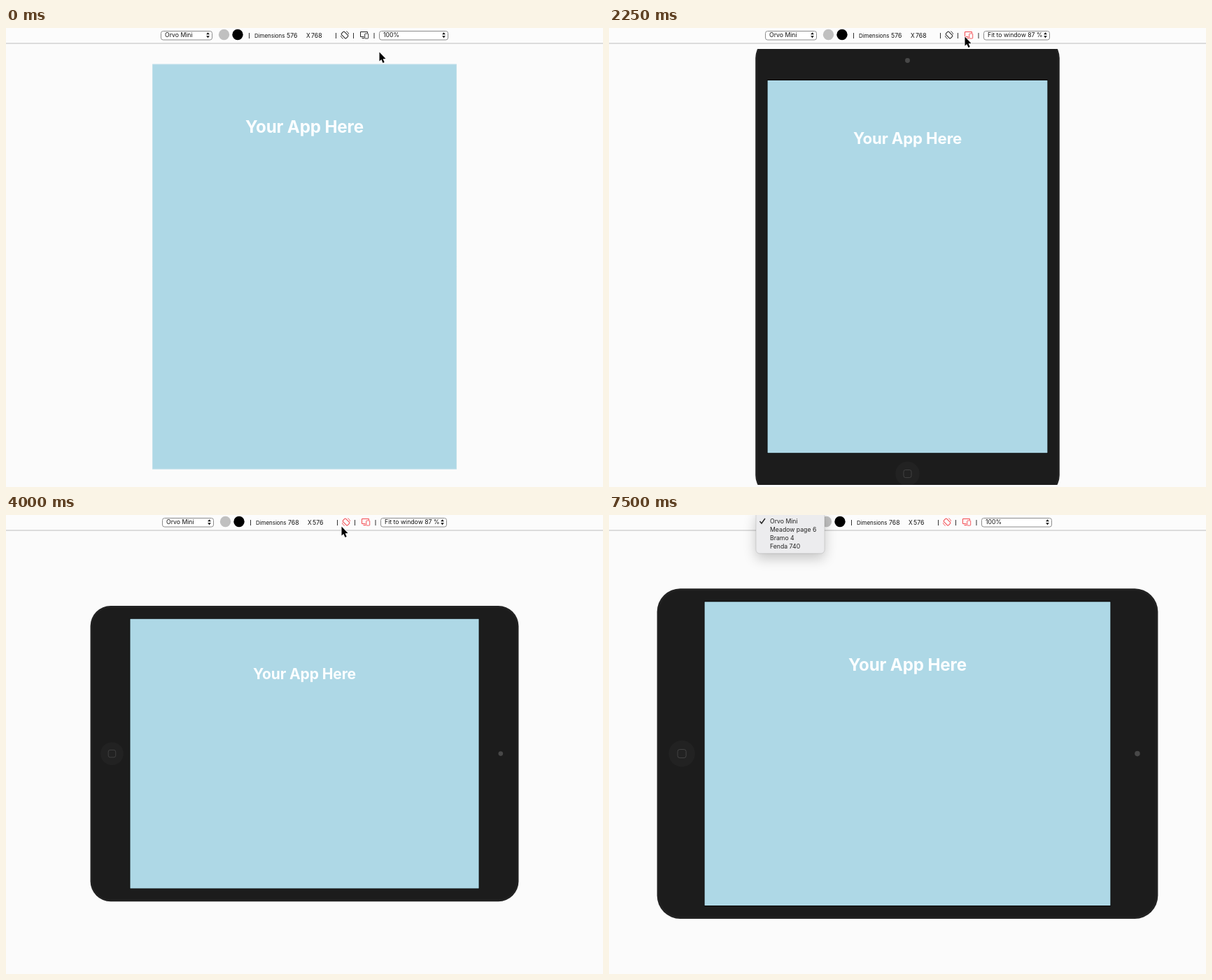
An HTML page with a canvas for the animation above (8000 ms loop, 853 by 657 pixels).

```html
<!DOCTYPE html>
<html lang="en">
<head>
<meta charset="utf-8">
<title>Device preview</title>
<style>
  html, body { margin: 0; width: 100%; height: 100%; overflow: hidden; background: #fbfbfb; }
  canvas { display: block; width: 853px; height: 657px; }
</style>
</head>
<body>
<canvas id="stage"></canvas>
<script>
const W = 853, H = 657, LOOP = 8000, STEP = 250;
const CX = 426.5, CY = 341.6;
const UNIT = 0.755;   // stage pixels per device unit
const FIT = 0.871;    // zoom that fits the window
const FONT = 'Inter, Roboto, sans-serif';
const RED = '#f4474d', INK = '#111';
const DEVICES = ['Orvo Mini', 'Meadow page 6', 'Bramo 4', 'Fenda 740'];

// start of each change, in ms
const FRAME_ON = 1600, FIT_ON = 2040, TURN_ON = 3605, FIT_OFF = 4100;
const MENU_ON = 5750, HOVER_ON = 6500;

// pointer stops: time, x, y
const STOPS = [
  [0, 533, 34], [330, 508, 12], [2750, 508, 12], [3050, 479, 16],
  [4000, 479, 16], [4500, 460, 18], [5250, 274, 11], [6000, 274, 11],
  [6250, 271, 3], [7000, 262, -20]
];

const canvas = document.getElementById('stage');
const ratio = window.devicePixelRatio || 1;
canvas.width = W * ratio;
canvas.height = H * ratio;
const ctx = canvas.getContext('2d');

const mix = (a, b, p) => a + (b - a) * p;

function ramp(t, start, span = 360) {
  const p = Math.min(1, Math.max(0, (t - start) / span));
  return p * p * (3 - 2 * p);
}

function text(str, x, y, size = 8.7, color = INK) {
  ctx.font = `400 ${size}px ${FONT}`;
  ctx.fillStyle = color;
  ctx.fillText(str, x, y);
}

function box(x, y, w, h, r, fill, stroke, line = 1) {
  ctx.beginPath();
  ctx.roundRect(x, y, w, h, r);
  if (fill) { ctx.fillStyle = fill; ctx.fill(); }
  if (stroke) { ctx.strokeStyle = stroke; ctx.lineWidth = line; ctx.stroke(); }
}

// rounded box around the current origin
function plate(w, h, r, fill, stroke) {
  box(-w / 2, -h / 2, w, h, r, fill, stroke);
}

function dot(x, y, r, color) {
  ctx.beginPath();
  ctx.arc(x, y, r, 0, Math.PI * 2);
  ctx.fillStyle = color;
  ctx.fill();
}

function path(...points) {
  ctx.beginPath();
  points.forEach(([x, y]) => ctx.lineTo(x, y));
}

function select(x, w, label) {
  box(x + 0.5, 4.5, w - 1, 12.5, 3, '#fff', '#8c8c8c');
  text(label, x + 6, 13.3);
  const a = x + w - 6.5;
  for (const dir of [-1, 1]) {
    const y = 10.3 + dir;
    path([a - 2.4, y], [a + 2.4, y], [a, y + dir * 3]);
    ctx.fill();
  }
}

function turnIcon(x, y, color) {
  ctx.save();
  ctx.translate(x, y);
  ctx.rotate(Math.PI / 4);
  plate(9.4, 5.8, 1.2, null, color);
  ctx.lineWidth = 0.8;
  for (const a of [-Math.PI / 2, Math.PI / 2]) {
    ctx.beginPath();
    ctx.arc(0, 0, 5.8, a - 0.4, a + 0.6);
    ctx.stroke();
  }
  ctx.restore();
}

function frameIcon(x, color) {
  ctx.strokeStyle = color;
  ctx.lineWidth = 1;
  path([x + 5.5, 12.5], [x + 0.5, 12.5], [x + 0.5, 5.5], [x + 10.5, 5.5], [x + 10.5, 7.5]);
  ctx.stroke();
  path([x + 2.5, 14.5], [x + 6, 14.5]);
  ctx.stroke();
  box(x + 6.7, 8, 5, 7, 0.8, null, color, 0.9);
}

function toolbar(t) {
  const fit = t > FIT_ON && t < FIT_OFF;
  const turned = t > TURN_ON;
  const dims = turned ? ['768', '576'] : ['576', '768'];
  const zoomWidth = fit ? 95 : turned ? 101 : 99;

  ctx.fillStyle = '#fcfcfc';
  ctx.fillRect(0, 0, W, 22);
  ctx.fillStyle = '#bdbdbd';
  ctx.fillRect(0, 21.5, W, 1);

  // the row stays centred as the zoom menu changes width
  ctx.save();
  ctx.translate((99 - zoomWidth) / 2, 0);
  select(221, 74, DEVICES[0]);
  dot(311.5, 9.5, 7.7, '#c0c0c0');
  dot(331, 9.5, 7.7, '#000');
  ctx.fillStyle = '#333';
  for (const x of [347, 471, 496, 525.5]) ctx.fillRect(x, 7, 1, 8);
  text('Dimensions', 355, 14, 7.9);
  text(dims[0], 401, 14);
  text('X', 429, 14, 8.3);
  text(dims[1], 436, 14);
  turnIcon(484, 10, turned ? RED : '#222');
  frameIcon(506, t > FRAME_ON ? RED : '#222');
  select(533, zoomWidth, fit ? 'Fit to window 87 %' : '100%');
  ctx.restore();
}

function controls(w, h, turned) {
  const [hx, hy] = turned ? [47 - w / 2, 0] : [0, h / 2 - 47];
  dot(hx, hy, 25, '#222');
  box(hx - 8, hy - 8, 16, 16, 4, null, '#494949', 1.2);
  if (turned) dot(w / 2 - 39, 0, 5, '#484848');
  else dot(0, 49 - h / 2, 5, '#484848');
}

function device(t) {
  const grow = ramp(t, FRAME_ON);
  const turn = ramp(t, TURN_ON, 460);
  const zoom = mix(1, FIT, ramp(t, FIT_ON) - ramp(t, FIT_OFF));
  const sw = mix(576, 768, turn), sh = mix(768, 576, turn);
  const w = sw + 2 * grow * mix(25, 90, turn);
  const h = sh + 2 * grow * mix(90, 25, turn);

  ctx.save();
  if (zoom < 1) {
    ctx.beginPath();
    ctx.rect(0, 30, W, 624);
    ctx.clip();
  }
  ctx.translate(CX, CY);
  ctx.scale(zoom * UNIT, zoom * UNIT);

  if (grow) {
    plate(w, h, 44 * grow, `rgba(34,34,34,${grow})`);
    plate(w - 8, h - 8, 40, '#1c1c1c');
    if (grow === 1) controls(w, h, turn > 0);
    plate(sw + 2, sh + 2, 0, '#000');
  }
  plate(sw, sh, 0, '#aed8e6');
  if (!grow) plate(sw - 1, sh - 1, 0, null, '#c6e2eb');

  ctx.font = `700 32px ${FONT}`;
  ctx.letterSpacing = '-0.2px';
  ctx.textAlign = 'center';
  ctx.fillStyle = '#fcfeff';
  ctx.fillText('Your App Here', 0, 130.5 - sh / 2);
  ctx.restore();
}

function menu(lit) {
  ctx.save();
  ctx.shadowColor = 'rgba(0,0,0,0.22)';
  ctx.shadowBlur = 18 * ratio;
  ctx.shadowOffsetY = 7 * ratio;
  box(210, -6, 98, 61, 5, '#ececee');
  ctx.restore();
  box(210, -6, 98, 61, 5, null, 'rgba(0,0,0,0.14)', 0.8);
  if (lit) {
    ctx.fillStyle = '#2f7bf6';
    ctx.fillRect(210, 2, 98, 12.5);
  }
  DEVICES.forEach((name, i) =>
    text(name, 230, 11.5 + i * 12.2, 8.7, lit && i === 0 ? '#fff' : '#222'));
  ctx.strokeStyle = lit ? '#fff' : '#222';
  ctx.lineWidth = 1.4;
  path([215.5, 9], [218, 12], [223, 5]);
  ctx.stroke();
}

function pointer(t) {
  const next = STOPS.findIndex(s => s[0] > t);
  const b = STOPS.at(next), a = next < 0 ? b : STOPS[next - 1];
  const p = ramp(t, a[0], b[0] - a[0] || 1);
  ctx.save();
  ctx.translate(mix(a[1], b[1], p) + 0.5, mix(a[2], b[2], p) + 0.5);
  path([0, 0], [0, 13], [2.8, 10.4], [5, 15.4], [7.2, 14.4], [5.1, 9.7], [9, 9.5]);
  ctx.closePath();
  ctx.lineJoin = 'round';
  ctx.strokeStyle = '#fff';
  ctx.lineWidth = 1.6;
  ctx.stroke();
  ctx.fillStyle = '#000';
  ctx.fill();
  ctx.restore();
}

function draw(now) {
  const t = Math.floor((now % LOOP) / STEP) * STEP;
  ctx.setTransform(ratio, 0, 0, ratio, 0, 0);
  ctx.fillStyle = '#fbfbfb';
  ctx.fillRect(0, 0, W, H);
  toolbar(t);
  device(t);
  if (t >= MENU_ON) menu(t === HOVER_ON);
  pointer(t);
}

const start = performance.now();
function tick() {
  draw(performance.now() - start);
  requestAnimationFrame(tick);
}
tick();
</script>
</body>
</html>
```
